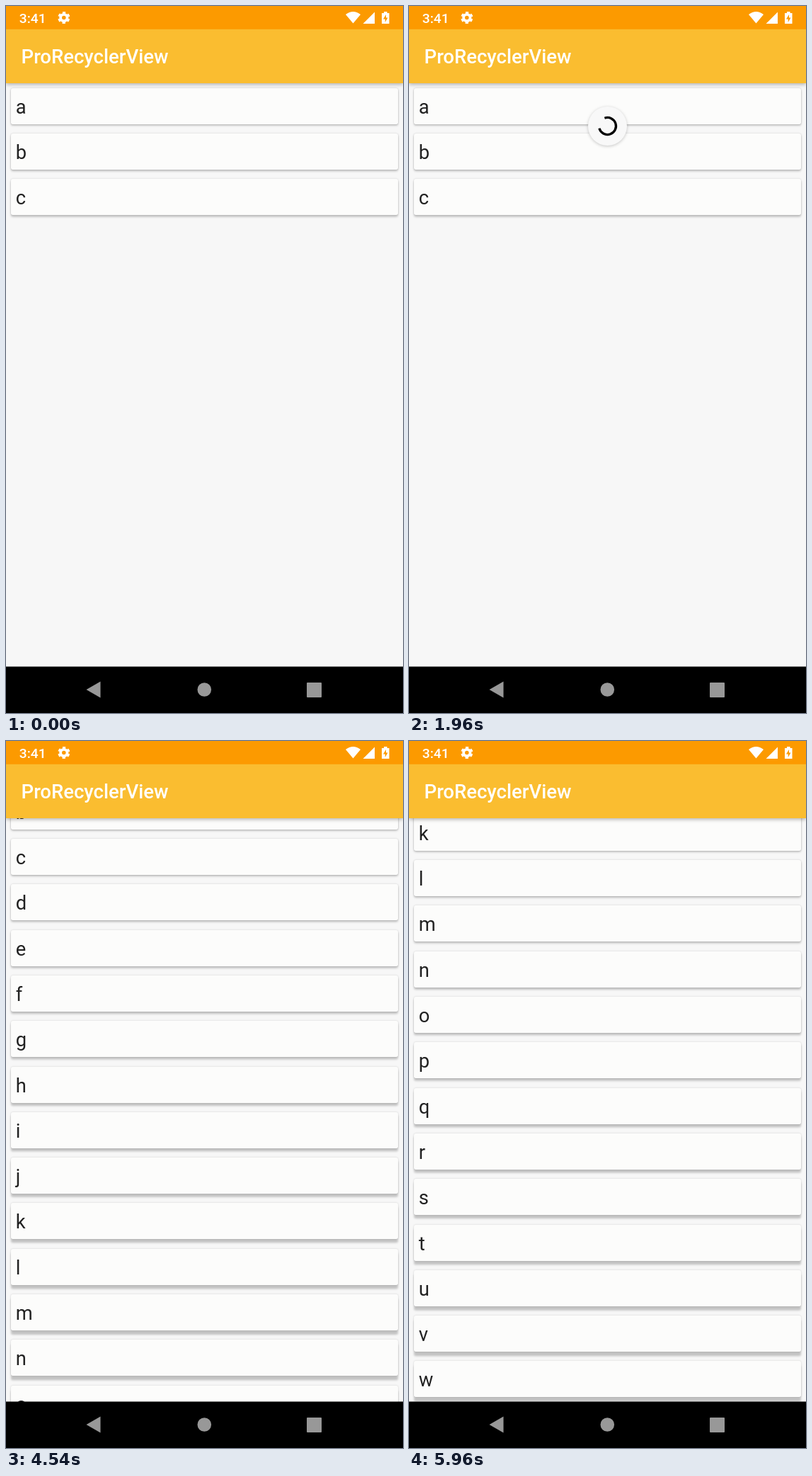
Recreate the animation shown at these times as an HTML page. Size 561 px wide and 998 px high, loop 6.08 s.

```html
<!DOCTYPE html>
<html lang="en">
<head>
<meta charset="utf-8">
<title>ProRecyclerView</title>
<style>
  html, body { margin: 0; width: 100%; height: 100%; overflow: hidden; background: #f7f7f7; }
  body { position: relative; font-family: Roboto, sans-serif; }
  #list { position: absolute; top: 109px; left: 0; width: 561px; height: 824px; overflow: hidden; }
  .card {
    position: absolute; left: 7px; width: 547px; height: 51px; box-sizing: border-box;
    padding-left: 6.8px; border-radius: 2.7px; background: #fcfcfb; color: #212121;
    font-size: 27.3px; line-height: 55.6px;
    box-shadow: 0 var(--drop) 3px rgba(0,0,0,.21), 0 0 2.5px rgba(0,0,0,.17);
  }
  #bar {
    position: absolute; top: 0; left: 0; width: 561px; height: 109px; background: #fabd30;
    box-shadow: 0 2px 5px rgba(0,0,0,.28);
  }
  #spinner {
    position: absolute; left: 253px; width: 55px; height: 55px; border-radius: 50%;
    background: #f8f8f8; box-shadow: 0 1px 4px rgba(0,0,0,.22);
  }
  svg { position: absolute; top: 0; left: 0; }
</style>
</head>
<body>
<div id="list">
  <div id="spinner">
    <svg width="55" height="55" viewBox="-27.5 -27.5 55 55">
      <g id="ring">
        <path id="arc" fill="none" stroke="#000" stroke-width="3.3"/>
        <path id="arrow" d="M-6 0H6L0 7Z"/>
      </g>
    </svg>
  </div>
  <svg width="561" height="824"><ellipse id="glow" cx="280.5" rx="673" fill="#fbbe30"/></svg>
</div>
<div id="bar"></div>
<svg width="561" height="998" font-weight="500" fill="#fff">
  <rect width="561" height="32.8" fill="#fc9a00"/>
  <text x="18.8" y="24" font-size="19.2">3:41</text>
  <g fill="none" stroke="#fff" transform="translate(81.8 16.5)">
    <circle r="4.7" stroke-width="3.8"/>
    <circle r="7.2" stroke-width="2.8" stroke-dasharray="4.1 3.44" stroke-dashoffset="-1.72"/>
  </g>
  <path d="M480 12Q490.5 4 501 12L490.5 24.5Z M521 8.5V25H504.500Z"/>
  <path d="M531 10H534V8H538.500V10H541.500V25H531Z"/>
  <path d="M537 12L533 18.500H535.700V23L539.500 16.500H537Z" fill="#fc9a00"/>
  <text x="21.6" y="81.3" font-size="27.5">ProRecyclerView</text>
  <rect y="932.5" width="561" height="65.5" fill="#000"/>
  <g fill="#989898">
    <path d="M113.500 965L133.500 953.500V976.500Z"/>
    <circle cx="280.300" cy="965" r="9.8"/>
    <rect x="425" y="955" width="21" height="21" rx="1"/>
  </g>
</svg>
<script>
const LOOP = 6080, FPS = 24, PITCH = 64.3, MAX_SCROLL = 655;
const $ = id => document.getElementById(id);
const [list, spinner, ring, arc, arrow, glow] =
  ['list', 'spinner', 'ring', 'arc', 'arrow', 'glow'].map($);

const cards = [...'abcdefghijklmnopqrstuvw'].map(letter => {
  const card = document.createElement('div');
  card.className = 'card';
  card.textContent = letter;
  list.insertBefore(card, spinner);
  return card;
});

const part = (t, from, to) => Math.min(1, Math.max(0, (t - from) / (to - from)));
const smooth = p => p * p * (3 - 2 * p);
const slow = p => 1 - (1 - p) ** 2;

function drawCards(t) {
  // The finger speeds up, then the fling runs into the end of the list.
  const drag = Math.max(0, t - 4420) / 121.67;
  const scroll = Math.min(MAX_SCROLL, 106.4 * drag ** 2.1);
  const fade = part(t, 2340, 2460);
  cards.forEach((card, i) => {
    const y = 6.8 + PITCH * i - scroll;
    card.style.top = y + 'px';
    card.style.opacity = i < 3 ? 1 : fade;
    // The light sits above the screen, so lower cards cast longer shadows.
    card.style.setProperty('--drop', 1.8 + Math.max(0, y) * 0.0062 + 'px');
  });
}

function drawSpinner(t) {
  const pull = smooth(part(t, 1000, 1700));
  const settle = slow(part(t, 1760, 1955));
  const y = -27.5 + 107.5 * pull - 20 * settle;
  const ready = part(pull, 0.3, 0.85);
  const sweep = 275 * ready * Math.PI / 180;
  const scale = 1 - part(t, 2090, 2240);
  spinner.style.top = y - 27.5 + 'px';
  spinner.style.transform = `scale(${scale})`;
  spinner.style.visibility = pull > 0 && scale > 0 ? 'visible' : 'hidden';

  const [x, z] = [Math.cos(sweep) * 12, Math.sin(sweep) * 12];
  arc.setAttribute('d', `M12 0A12 12 0 ${+(sweep > Math.PI)} 1 ${x} ${z}`);
  ring.setAttribute('transform', `rotate(${-205 + 75 * pull + 20 * settle})`);
  ring.setAttribute('opacity', ready < 1 ? 0.3 * Math.min(1, ready * 4) : 0.3 + 0.7 * part(pull, 0.85, 1));
  arrow.setAttribute('transform',
    `translate(${x} ${z}) rotate(${sweep * 180 / Math.PI}) scale(${ready * (1 - part(t, 1760, 1900))})`);
}

function drawGlow(t) {
  const grow = slow(part(t, 4710, 4820));
  const rest = 1 - slow(part(t, 4825, 5450));
  const size = grow * rest;
  glow.setAttribute('ry', 673 * size);
  glow.setAttribute('cy', 823.5 + 583 * size);
  glow.setAttribute('opacity', (0.09 + 0.06 * grow) * rest);
}

function frame(now) {
  // The screen advances in steps of 1/24 s; 5 ms covers rounding to 10 ms.
  const t = Math.floor((now % LOOP + 5) * FPS / 1000) * 1000 / FPS;
  drawCards(t);
  drawSpinner(t);
  drawGlow(t);
  requestAnimationFrame(frame);
}
frame(performance.now());
</script>
</body>
</html>
```
